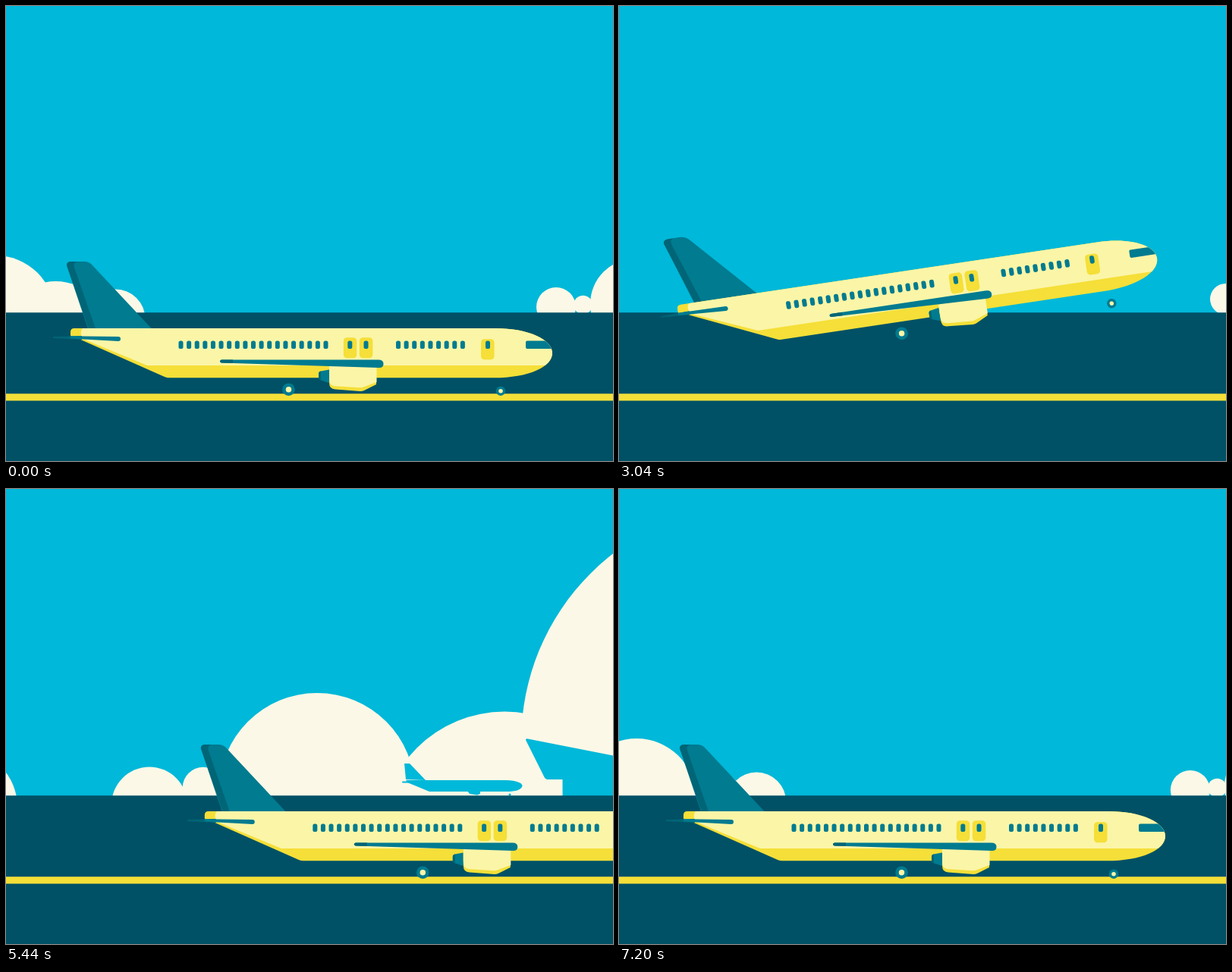
Write an HTML page with a canvas that moves like this. It is 800 by 600 pixels and loops after 7240 ms.

```html
<!DOCTYPE html>
<html lang="en">
<head>
<meta charset="utf-8">
<title>Runway loop</title>
<style>
  html, body { margin: 0; width: 100%; height: 100%; overflow: hidden; background: #00b8d9; }
  canvas { display: block; width: 800px; height: 600px; }
</style>
</head>
<body>
<canvas id="stage" width="800" height="600"></canvas>
<script>
const ctx = document.getElementById('stage').getContext('2d');
const LOOP = 7240, STEP = 40, HORIZON = 404.2;
const SKY = '#00b8d9', CLOUD = '#fcf8e7', GROUND = '#005166';
const PALE = '#fbf5a7', YELLOW = '#f5df38', TEAL = '#007b90', DEEP = '#006577';

function shape(color, d) {
  ctx.fillStyle = color;
  ctx.fill(new Path2D(d));
}

function box(color, x, y, w, h, r = 0) {
  ctx.fillStyle = color;
  ctx.beginPath();
  ctx.roundRect(x, y, w, h, r);
  ctx.fill();
}

function disc(color, x, y, r) {
  ctx.fillStyle = color;
  ctx.beginPath();
  ctx.arc(x, y, r, 0, Math.PI * 2);
  ctx.fill();
}

const repeat = (count, draw) => {
  for (let i = 0; i < count; i++) draw(i);
};

const ease = (t, start, length) => {
  const p = Math.min(1, Math.max(0, (t - start) / length));
  return p * p * (3 - 2 * p);
};

// Main billows are [x, y, radius]; a small puff fills every narrow gap between neighbours.
function cloudBank(...billows) {
  const puffs = [];
  billows.slice(1).forEach(([x, , r], i) => {
    const [px, , pr] = billows[i];
    const left = px + pr, gap = x - r - left;
    if (gap > 0 && gap < 80) puffs.push([left + gap / 2, 394, gap * 0.65]);
  });
  return [...billows, ...puffs];
}

const runwayClouds = cloudBank(
  [725, 397, 26], [830, 393, 60], [1000, 342, 150], [1114, 470, 240],
  [1316, 381, 30], [1376, 432, 76], [1497, 419, 57]
);
const flightClouds = cloudBank(
  [799.5, 386.5, 20.5], [875, 390.5, 49], [1033, 407.5, 124], [1305, 348, 101],
  [1407, 366, 50], [1496, 412, 63], [1701, 381.5, 79], [1752, 419, 75],
  [2001, 416.5, 50], [2222, 398, 129], [2469, 456.5, 163], [2803, 332, 312],
  [3362, 407, 78], [3441, 436, 73], [3520, 412.5, 39]
);
const AIRPORT_X = 2235;

const runwayScroll = t => 0.7 * t + 0.000082 * t * t;
const flightScroll = t => 0.755 * (t - 3040) + 0.165 * Math.max(0, t - 6000);

function drawClouds(bank, scroll) {
  for (const [x, y, r] of bank) disc(CLOUD, x - scroll, y, r);
}

function drawAirport(x) {
  ctx.save();
  ctx.translate(x, 0);

  // Terminal hall and control tower
  shape(SKY, 'M262 331Q262 328.5 265 329.5L512 378V405H310.5V383H291Q288 383 286.5 380Z');
  box(SKY, 435, 280, 15, 95);
  box(SKY, 423, 278.5, 39, 4, 2);
  shape(SKY, 'M421 252H464.5L460 280H426Z');
  box(SKY, 417, 250.5, 51, 3, 1.5);
  [4, 15, 8, 11].forEach((h, i) => box(SKY, 442.5 + i * 4.8, 251 - h, 2.4, h));

  // Office block, footbridge and sheds
  box(SKY, 512, 353, 51, 52, 2);
  box(SKY, 519.5, 342.5, 25, 14, 3);
  box(SKY, 562, 385, 90, 2.5);
  repeat(6, i => box(SKY, 574 + i * 13, 386, 2, 19));
  shape(SKY, 'M588 387Q594 378.5 605 378.5T622 387Z');
  box(SKY, 650, 374, 124, 31, 3);
  repeat(4, i => shape(SKY, `M${665 + i * 25} 375l28 -7q2 -1 2 1v7z`));

  // Parked aircraft
  shape(SKY, 'M104 384H236Q257 385 257.5 391.5Q256 399 236 399H135L106 387Z');
  shape(SKY, 'M104 383L102 362H109L130 384Z');
  box(SKY, 99, 385.5, 18, 2, 1);
  shape(SKY, 'M185 398H202V402L198 403.5L188 402Z');
  disc(SKY, 241, 403, 1.6);
  ctx.restore();
}

const BODY = 'M85 430Q85 425 90 425H645C689 425 720 440 720 457.5C720 476 689 490.3 643 490.3H215Q212 490.3 209 489L94 438Q85 437 85 434Z';

const porthole = x => box(TEAL, x - 3, 441.5, 6, 10.5, 2.6);
const windowRow = (x, count) => repeat(count, i => porthole(x + i * 10.61));

function door(x, y, windowX) {
  box(YELLOW, x, y, 17.5, 27, 4.5);
  porthole(windowX);
}

function wheel(x, y, r) {
  disc(TEAL, x, y, r);
  disc(PALE, x, y, r * 0.45);
}

function drawPlane() {
  // Fin
  shape(TEAL, 'M80 342Q80 337 86 337H103Q109 337 113 341L192 425.5H108Z');
  shape(DEEP, 'M80 342Q80 337 86 337H94Q88 338 90 345L118 425.5H109Z');

  // Fuselage
  shape(YELLOW, BODY);
  ctx.save();
  ctx.clip(new Path2D(BODY));
  shape(PALE, 'M102 424Q98 427 99 433V438L186 474H722V424Z');
  box(TEAL, 685, 441.5, 40, 10.5, 2);
  ctx.restore();

  // Tailplane
  shape(DEEP, 'M62 436.3L100 435V440L62 438Z');
  shape(TEAL, 'M85 435.2L148 436Q151 436 151 439T148 442L85 438.5Z');

  windowRow(230.5, 19);
  windowRow(517, 9);
  door(444.8, 437.3, 453.3);
  door(465.8, 437.3, 474.5);
  door(626, 439.3, 635);

  // Engine
  shape(TEAL, 'M426 479.5L415 481.5Q412 482 412 485V490Q412 492.5 415 493.5L426 497Z');
  shape(DEEP, 'M415 481.5Q412 482 412 485V490Q412 492.5 415 493.5Z');
  shape(YELLOW, 'M426 476H488V499L472 507Q470 508 467 508L434 505.5Q426 505 426 497Z');
  shape(PALE, 'M426 475H488.5V496L471 502.5Q469 503.5 466 503.3L434 501.3Q426 500.5 426 493Z');

  // Wing
  shape(TEAL, 'M284 466.5H491Q497.5 466.5 497.5 472T491 477L284 470.5Q282 470 282 468.5T284 466.5Z');
  shape(DEEP, 'M284 466.5H299V471L284 470.5Q282 470 282 468.5T284 466.5Z');

  wheel(372.5, 505.7, 8.3);
  wheel(652, 507.7, 6.2);
}

// Take-off pivots on the main wheel; afterwards the plane drifts back in tail first.
function planePose(t) {
  if (t >= 3820) return { x: 740 * (1 - ease(t, 3820, 2375)), y: 0, angle: 0 };
  return {
    x: 800 * Math.max(0, (t - 3030) / 770) ** 2,
    y: -360 * ease(t, 2900, 480),
    angle: -12.5 * ease(t, 2350, 1105)
  };
}

function draw(t) {
  box(SKY, 0, 0, 800, 600);

  // Both banks run across the loop seam.
  const flightTime = t < 400 ? t + LOOP : t;
  if (flightTime > 2800) {
    const scroll = flightScroll(flightTime);
    drawClouds(flightClouds, scroll);
    drawAirport(AIRPORT_X - scroll);
  }
  const runwayTime = t > 7000 ? t - LOOP : t;
  if (runwayTime < 2000) drawClouds(runwayClouds, runwayScroll(runwayTime));

  box(GROUND, 0, HORIZON, 800, 600 - HORIZON);
  box(YELLOW, 0, 511.2, 800, 9.4);

  const pose = planePose(t);
  ctx.save();
  ctx.translate(372.5 + pose.x, 506 + pose.y);
  ctx.rotate(pose.angle * Math.PI / 180);
  ctx.translate(-372.5, -506);
  drawPlane();
  ctx.restore();
}

const began = performance.now();
function tick() {
  const t = Math.max(0, performance.now() - began) % LOOP;
  draw(Math.floor(t / STEP) * STEP);
  requestAnimationFrame(tick);
}
tick();
</script>
</body>
</html>
```
